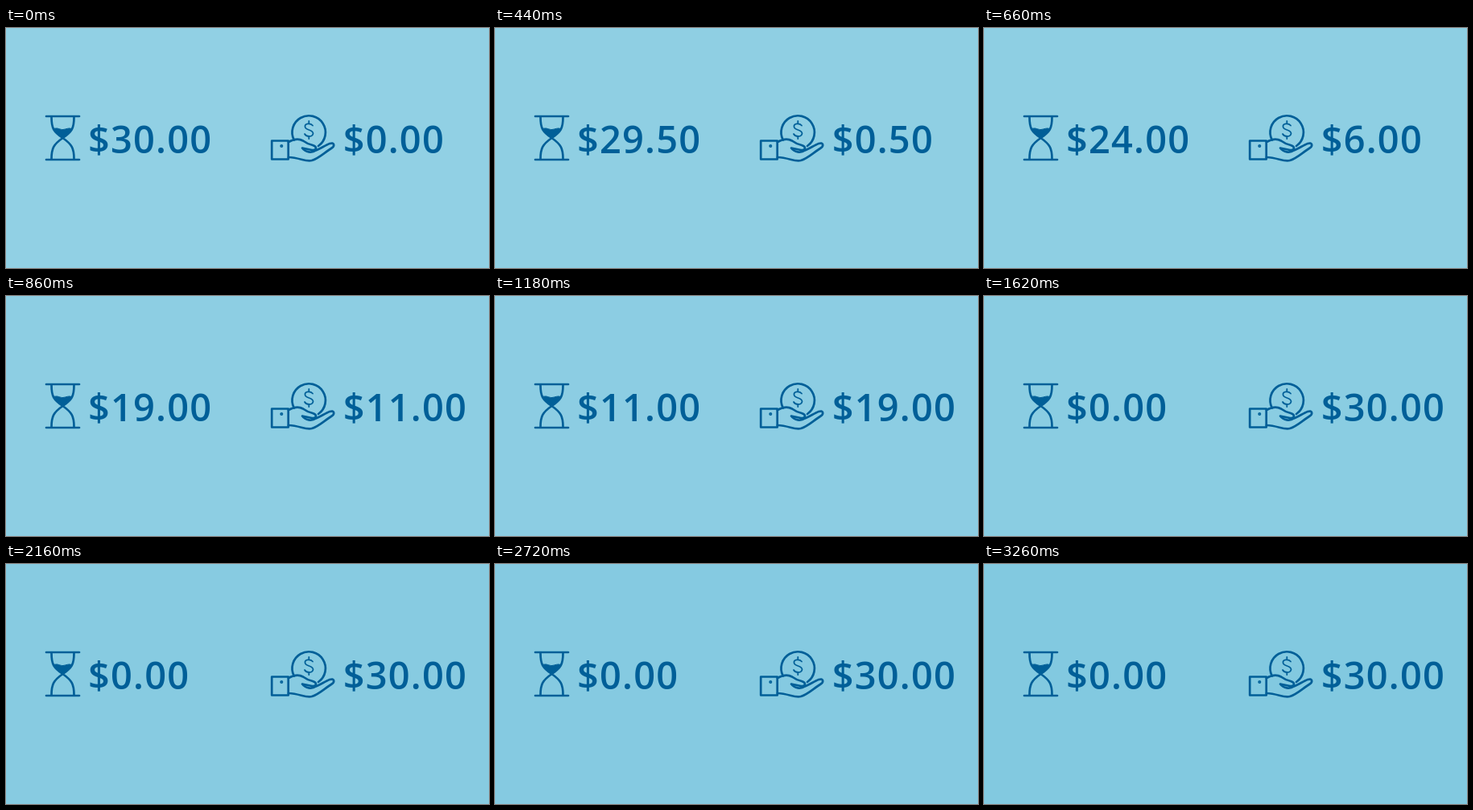
These frames come from a looping animation (600x299 px, 3280 ms). An HTML page:

```html
<!DOCTYPE html>
<html lang="en">
<head>
<meta charset="utf-8">
<title>Time to money</title>
<style>
  html, body { margin: 0; width: 100%; height: 100%; overflow: hidden; background: rgb(145,208,228); }
  svg { display: block; width: 600px; height: 299px; }
  text { font: 600 47px "Open Sans", "Noto Sans", sans-serif; letter-spacing: 1.2px; fill: #005f98; }
  .line { fill: none; stroke: #005f98; stroke-width: 2.7; stroke-linecap: round; stroke-linejoin: round; }
</style>
</head>
<body>
<svg viewBox="0 0 600 299">
  <!-- hourglass -->
  <g class="line">
    <path d="M50 110H91M50 164H91"/>
    <path d="M56.5 111C56.5 125 59 129 70.5 137C59 145 56.5 150 56.5 163"/>
    <path d="M84.5 111C84.5 125 82 129 70.5 137C82 145 84.5 150 84.5 163"/>
    <path d="M59.5 125.5C64 123.5 67 127 71 126.5C75 126 78 124 81.5 125.5C79 130 74 133 70.5 137C67 133 62 130 59.5 125.5Z" fill="#005f98" stroke-width="1"/>
  </g>
  <!-- coin in hand -->
  <g class="line">
    <path d="M357.8 139.5A20.7 20.7 0 1 1 388 147"/>
    <path d="M381 121.5C378 118 371 119 371.5 123C372 128 381.5 126 381.5 131.5C381 136 373 136 371 132M376.3 116V119M376.3 135V138" stroke-width="1.8"/>
    <path d="M330.2 140.5H350.7V163.5H330.2Z"/>
    <circle cx="342.3" cy="147" r="1.2" stroke-width="1.6"/>
    <path d="M351 142C357 138.5 364 137.5 369 140.5C373 143.5 377 145 381 146C387 148 386 152.5 380 152L368 149.5C372 155 380 156 385 152.5C391 150 397 146 402 144C408 142 409 147 404 150C396 155 388 163 380 165C372 167 365 161.5 351 161"/>
  </g>
  <text id="left" x="102" y="155.5"></text>
  <text id="right" x="418.7" y="155.5"></text>
</svg>
<script>
  const LOOP = 3280, STEP = 20, START = 420, TOTAL = 30;
  const from = [145, 208, 228], to = [130, 201, 224];
  const left = document.getElementById("left");
  const right = document.getElementById("right");
  const money = v => "$" + v.toFixed(2);

  function draw(now) {
    const t = now % LOOP;
    // fifty cents move across every 20 ms
    const steps = Math.floor((t - START) / STEP);
    const paid = Math.min(TOTAL, Math.max(0, steps * 0.5));
    left.textContent = money(TOTAL - paid);
    right.textContent = money(paid);

    const mix = from.map((c, i) => Math.round(c + (to[i] - c) * t / LOOP));
    document.body.style.background = `rgb(${mix})`;
  }

  const begin = performance.now();
  function tick() {
    draw(performance.now() - begin);
    requestAnimationFrame(tick);
  }
  tick();
</script>
</body>
</html>
```
